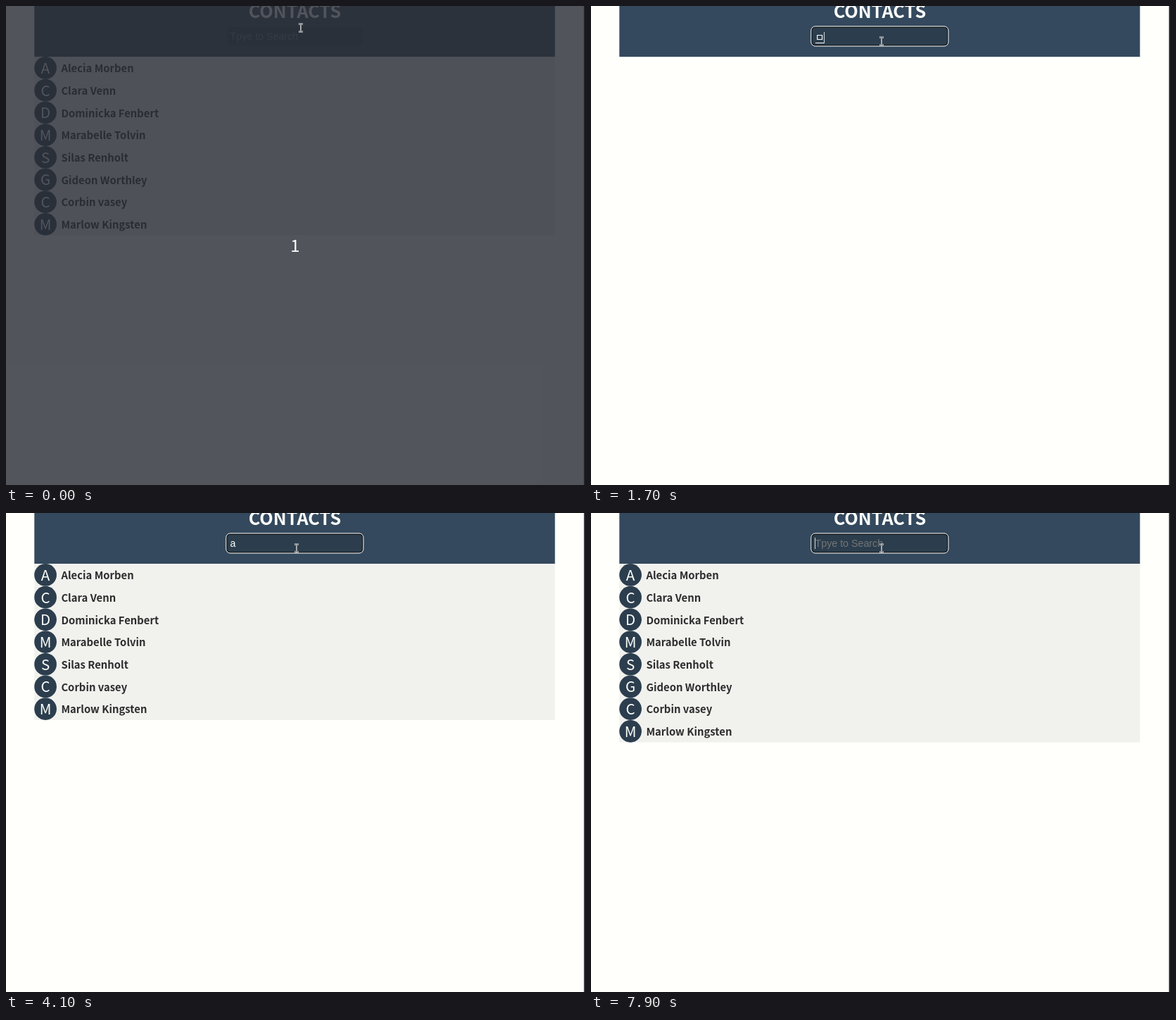
Animation of 823x680 px, one loop 8000 ms. Source, as an HTML page:

```html
<!DOCTYPE html>
<html lang="en">
<head>
<meta charset="utf-8">
<title>Contact search</title>
<style>
  html, body { margin: 0; width: 100%; height: 100%; overflow: hidden; background: #fffffc; }
  svg { display: block; width: 823px; height: 680px; }
  text { font-family: "Noto Sans CJK KR", "Noto Sans CJK JP", "Noto Sans", sans-serif; white-space: pre; }
  .title { font-size: 25.34px; font-weight: 700; fill: #fffffc; text-anchor: middle; }
  .name { font-size: 14.83px; font-weight: 700; fill: #2d2d2d; }
  .initial { font-size: 20.6px; fill: #fffffc; text-anchor: middle; }
  .field { font-family: "Liberation Sans", Arial, sans-serif; font-size: 14.26px; }
  .jamo { font-size: 14.26px; }
  .count { font-size: 24px; fill: #fff; text-anchor: middle; }
</style>
</head>
<body>
<svg viewBox="0 0 823 680">
  <defs>
    <path id="beam" d="M-2-5.5H-1L0-4.5L1-5.5H2M0-4.5V4.5M-2 5.5H-1L0 4.5L1 5.5H2"/>
  </defs>
  <rect width="823" height="680" fill="#fffffc"/>
  <rect x="40.3" width="740" height="72.1" fill="#34495d"/>
  <text class="title" x="410.5" y="17.2">CONTACTS</text>

  <rect x="314" y="30" width="193" height="26" rx="5" fill="#2c3e4e"/>
  <g id="ring" fill="none">
    <rect x="313.8" y="29.9" width="193.2" height="26.1" rx="5" stroke="#101010" stroke-width="1.5"/>
    <rect x="312.8" y="28.9" width="195.2" height="28.1" rx="6" stroke="#fff"/>
  </g>
  <text id="hint" class="field" x="318.5" y="47.9" fill="#757575">Tpye to Search</text>
  <text id="typed" class="field" x="318.5" y="47.9" fill="#fff"></text>
  <g id="composing">
    <text class="jamo" x="318.5" y="50" fill="#fff">ㅁ</text>
    <rect x="319" y="52" width="12" height="1" fill="#fff"/>
  </g>
  <rect id="caret" width="1" height="16" fill="#fff" fill-opacity=".8"/>

  <rect id="panel" x="40.3" y="72.1" width="740" fill="#f1f1ee"/>
  <g id="rows"></g>

  <g id="overlay">
    <rect width="823" height="680" fill="#292d36" fill-opacity=".81"/>
    <text class="count" x="411" y="349">1</text>
  </g>
  <rect x="821.6" width="1.4" height="680" fill="#191a21"/>

  <g id="pointer" fill="none" stroke-linecap="square">
    <use href="#beam" stroke="#fff" stroke-width="2"/>
    <use href="#beam" stroke="#22272d" stroke-width=".8"/>
  </g>
</svg>
<script>
const LOOP = 8000, ROW = 31.7, TOP = 72.1;
const NAMES = ["Alecia Morben", "Clara Venn", "Dominicka Fenbert", "Marabelle Tolvin",
  "Silas Renholt", "Gideon Worthley", "Corbin vasey", "Marlow Kingsten"];
const CARET = { "": [318, 35], "ㅁ": [331, 37], a: [326, 35], c: [325, 35] };

// Each track lists [start time, value]; a value holds until the next start.
const TRACKS = {
  pointer: [[0, [419, 31]], [100, [414, 46]], [400, [413, 50]]],
  value: [[0, ""], [1700, "ㅁ"], [2900, ""], [3600, "a"], [6200, ""], [6400, "c"], [7800, ""]],
  query: [[0, ""], [1700, "ㅁ"], [3100, ""], [3800, "a"], [6200, ""], [6400, "c"], [7900, ""]],
  caret: [[0, false], [1100, true], [2200, false], [2900, true], [4100, false], [4700, true],
    [5500, false], [5900, true], [6900, false], [7400, true]]
};

const $ = id => document.getElementById(id);
const show = (id, on) => { $(id).style.display = on ? "" : "none"; };
const at = (track, t) => TRACKS[track].findLast(([start]) => start <= t)[1];

function add(parent, tag, attrs, text = "") {
  const el = document.createElementNS("http://www.w3.org/2000/svg", tag);
  for (const key in attrs) el.setAttribute(key, attrs[key]);
  el.textContent = text;
  return parent.appendChild(el);
}

const rows = NAMES.map(name => {
  const g = add($("rows"), "g", {});
  add(g, "circle", { cx: 56.1, cy: ROW / 2, r: ROW / 2, fill: "#2c3e4e" });
  add(g, "text", { class: "initial", x: 56.1, y: 23.7 }, name[0]);
  add(g, "text", { class: "name", x: 78.4, y: 22.2 }, name);
  return { name: name.toLowerCase(), g };
});

function filterRows(query) {
  let count = 0;
  for (const { name, g } of rows) {
    const match = name.includes(query);
    g.style.display = match ? "" : "none";
    if (match) g.setAttribute("transform", `translate(0 ${TOP + ROW * count++})`);
  }
  $("panel").setAttribute("height", ROW * count);
}

function draw(t) {
  const value = at("value", t), composing = value === "ㅁ";
  const [x, y] = CARET[value];
  show("overlay", t < 100);
  show("ring", t >= 1100);
  show("hint", !value);
  show("composing", composing);
  show("caret", at("caret", t));
  $("typed").textContent = composing ? "" : value;
  $("caret").setAttribute("x", x);
  $("caret").setAttribute("y", y);
  $("pointer").setAttribute("transform", `translate(${at("pointer", t).join(" ")})`);
  filterRows(at("query", t));
}

function tick() {
  draw(performance.now() % LOOP);
  requestAnimationFrame(tick);
}
tick();
</script>
</body>
</html>
```
